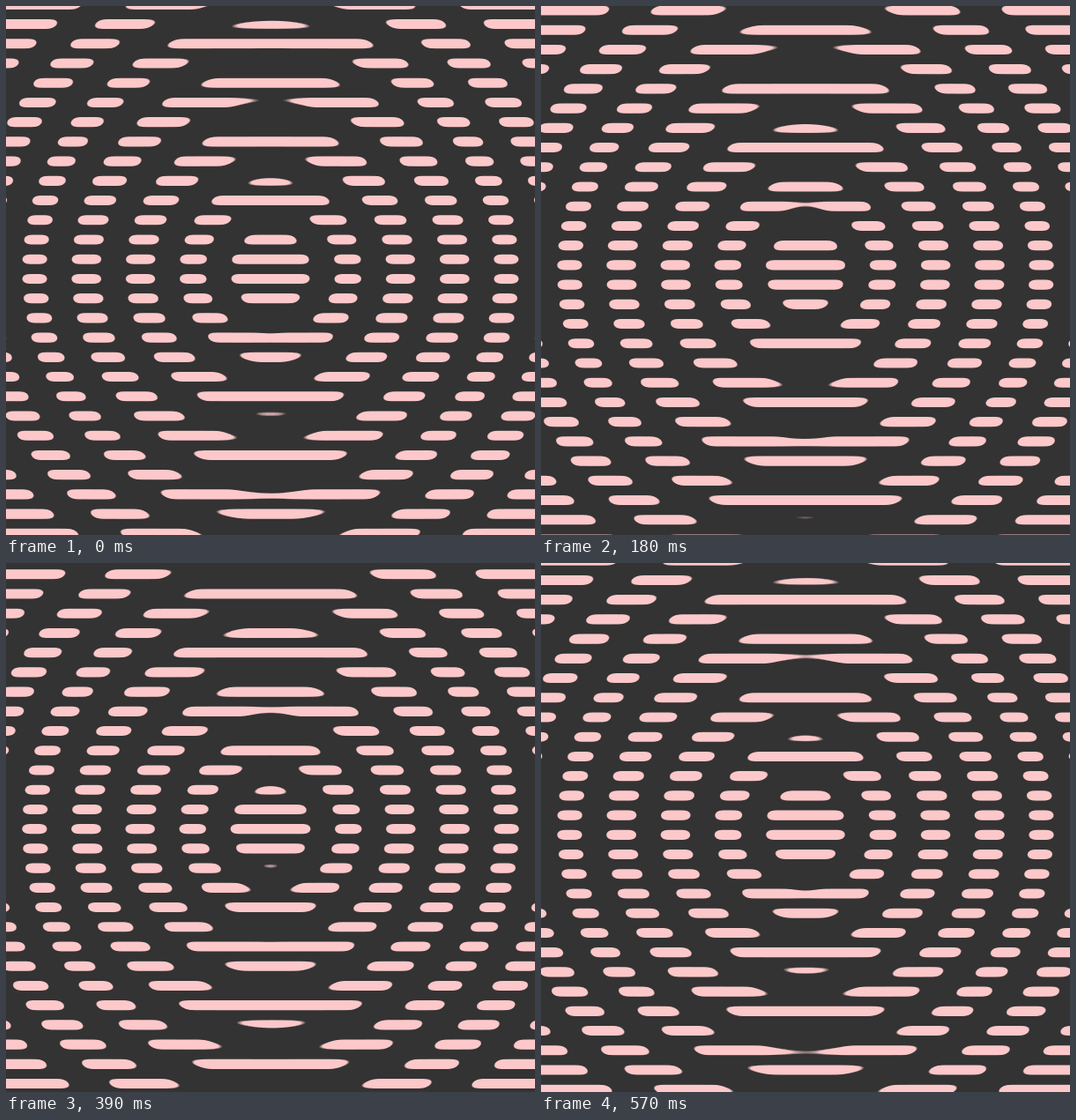
These frames come from a looping animation (600 by 600 pixels, 0.6 s). An HTML page:

```html
<!DOCTYPE html>
<html lang="en">
<head>
<meta charset="utf-8">
<title>Striped rings</title>
<style>
html, body { margin: 0; width: 100%; height: 100%; overflow: hidden; background: #333; }
svg { display: block; }
</style>
</head>
<body>
<svg width="600" height="600" viewBox="0 0 600 600">
  <!-- Blur, sharpen around mid grey, then map black and white to the two colours -->
  <filter id="melt" filterUnits="userSpaceOnUse" x="-40" y="-40" width="680" height="680"
          color-interpolation-filters="sRGB">
    <feGaussianBlur stdDeviation="5"/>
    <feComponentTransfer>
      <feFuncR type="linear" slope="14" intercept="-6.5"/>
      <feFuncG type="linear" slope="14" intercept="-6.5"/>
      <feFuncB type="linear" slope="14" intercept="-6.5"/>
    </feComponentTransfer>
    <feComponentTransfer>
      <feFuncR type="table" tableValues="0.2 0.992"/>
      <feFuncG type="table" tableValues="0.2 0.788"/>
      <feFuncB type="table" tableValues="0.2 0.796"/>
    </feComponentTransfer>
  </filter>
  <g filter="url(#melt)" fill="none" stroke="#000">
    <rect x="-60" y="-60" width="720" height="720" fill="#fff" stroke="none"/>
    <g id="gaps" stroke-width="24.3"></g>
    <path id="bars"/>
  </g>
</svg>
<script>
const LOOP = 600, STEP = 30;
const PITCH = 600 / 27;            // distance between stripes
const START = 298.33;              // centre of one dark bar at time 0
const RADII = [59.35, 117.4, 178.5, 239.8, 295.6, 356.4];

const gaps = document.getElementById('gaps');
const bars = document.getElementById('bars');

gaps.innerHTML = RADII.map(r => `<circle cx="300" cy="300" r="${r}"/>`).join('');

let lines = '';
for (let k = -17; k <= 17; k++) lines += `M-60 ${START + k * PITCH}H660`;
bars.setAttribute('d', lines);
bars.setAttribute('stroke-width', PITCH / 2);

const origin = performance.now();
let shown = -1;
function tick() {
  const step = Math.floor((performance.now() - origin) % LOOP / STEP);
  if (step !== shown) {
    shown = step;
    bars.setAttribute('transform', `translate(0 ${PITCH * step * STEP / LOOP})`);
  }
  requestAnimationFrame(tick);
}
tick();
</script>
</body>
</html>
```
